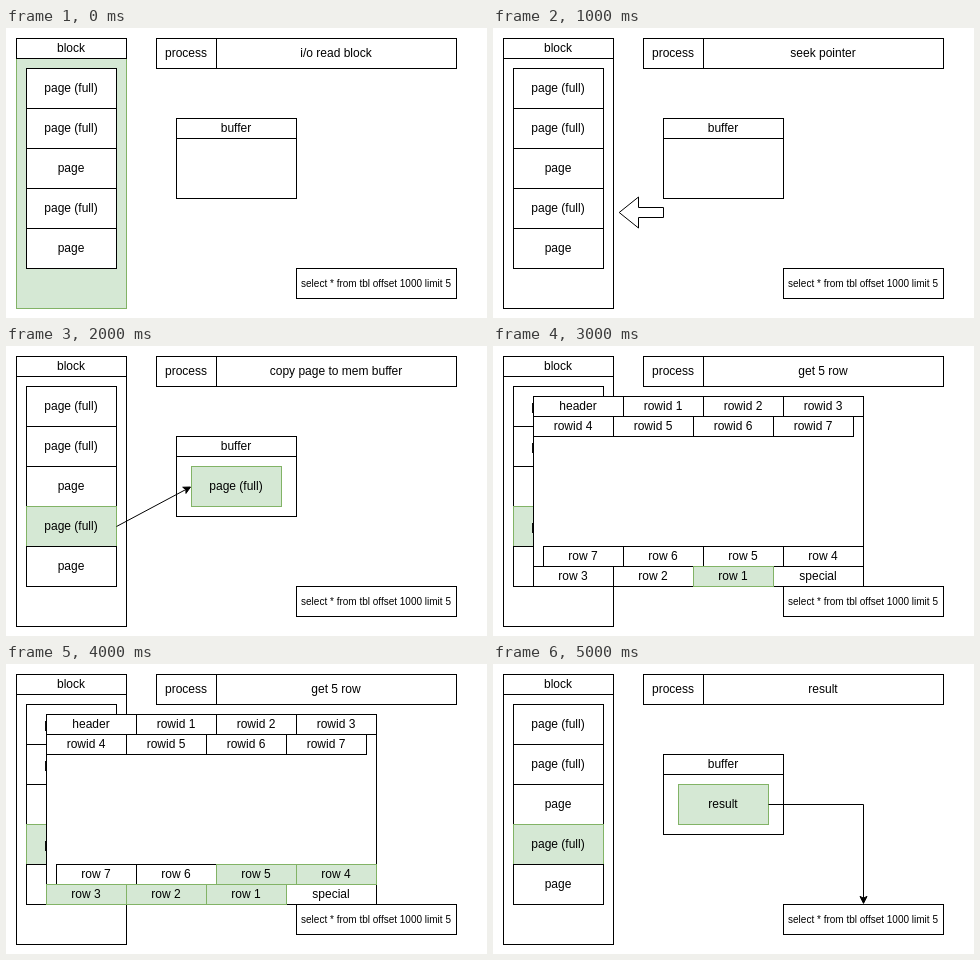
An HTML page with a canvas that plays this animation: 481 px wide and 290 px high, repeating every 6 s.

```html
<!DOCTYPE html>
<html lang="en">
<head>
<meta charset="utf-8">
<title>Reading a page from a block</title>
<style>
  html, body { margin: 0; width: 100%; height: 100%; overflow: hidden; background: #fff; }
  canvas { display: block; }
</style>
</head>
<body>
<canvas id="stage" width="481" height="290"></canvas>
<script>
const ctx = document.getElementById('stage').getContext('2d');
const STEP_MS = 1000;
const TITLES = ['i/o read block', 'seek pointer', 'copy page to mem buffer',
  'get 5 row', 'get 5 row', 'result'];
const PLAIN = { fill: '#fff', line: '#000' };
const GREEN = { fill: '#d5e8d4', line: '#82b366' };

function label(text, x, y, size = 12) {
  ctx.font = `${size}px "Liberation Sans", Arial, sans-serif`;
  ctx.textAlign = 'center';
  ctx.fillStyle = '#000';
  ctx.fillText(text, x, y + (size > 10 ? 4 : 3.5));
}

function box(x, y, w, h, text = '', look = PLAIN, size = 12) {
  ctx.fillStyle = look.fill;
  ctx.strokeStyle = look.line;
  ctx.lineWidth = 1;
  ctx.fillRect(x + 0.5, y + 0.5, w, h);
  ctx.strokeRect(x + 0.5, y + 0.5, w, h);
  if (text) label(text, x + w / 2, y + h / 2, size);
}

function trace(points) {
  ctx.beginPath();
  for (const [x, y] of points) ctx.lineTo(x + 0.5, y + 0.5);
}

// Polyline ending in a notched arrowhead
function connector(points) {
  const [tx, ty] = points[points.length - 1];
  const [px, py] = points[points.length - 2];
  const len = Math.hypot(tx - px, ty - py);
  const ux = (tx - px) / len, uy = (ty - py) / len;
  const at = (back, side) => [tx - ux * back - uy * side, ty - uy * back + ux * side];
  ctx.strokeStyle = ctx.fillStyle = '#000';
  ctx.lineWidth = 1;
  trace([...points.slice(0, -1), at(6.37, 0)]);
  ctx.stroke();
  trace([at(1.12, 0), at(8.12, 3.5), at(6.37, 0), at(8.12, -3.5)]);
  ctx.closePath();
  ctx.fill();
  ctx.stroke();
}

function pointer() {
  trace([[170, 189], [145, 189], [145, 199.5], [125.7, 184], [145, 168.5], [145, 179], [170, 179]]);
  ctx.closePath();
  ctx.fillStyle = '#fff';
  ctx.strokeStyle = '#000';
  ctx.fill();
  ctx.stroke();
}

function block(step) {
  box(10, 10, 110, 270, '', step === 0 ? GREEN : PLAIN);
  box(10, 10, 110, 20, 'block');
  [1, 1, 0, 1, 0].forEach((full, i) => {
    const look = i === 3 && step >= 2 ? GREEN : PLAIN;
    box(20, 40 + i * 40, 90, 40, full ? 'page (full)' : 'page', look);
  });
}

function buffer(content) {
  box(170, 90, 120, 80);
  box(170, 90, 120, 20, 'buffer');
  if (content) box(185, 120, 90, 40, content, GREEN);
}

function pageDetail(rowsRead) {
  box(40, 50, 330, 190);
  box(40, 50, 90, 20, 'header');
  for (let i = 1; i <= 7; i++) {
    const x = i < 4 ? 50 + i * 80 : 40 + (i - 4) * 80;
    box(x, i < 4 ? 50 : 70, 80, 20, 'rowid ' + i);
  }
  box(280, 220, 90, 20, 'special');
  // Rows fill from the right; later ones are drawn beneath the ones already read
  for (let i = 7; i >= 1; i--) {
    const x = i < 4 ? 280 - i * 80 : 290 - (i - 4) * 80;
    box(x, i < 4 ? 220 : 200, 80, 20, 'row ' + i, i <= rowsRead ? GREEN : PLAIN);
  }
}

function draw(step) {
  ctx.fillStyle = '#fff';
  ctx.fillRect(0, 0, 481, 290);
  block(step);
  box(150, 10, 60, 30, 'process');
  box(210, 10, 240, 30, TITLES[step]);
  box(290, 240, 160, 30, 'select * from tbl offset 1000 limit 5', PLAIN, 10);

  if (step === 3 || step === 4) {
    pageDetail(step === 3 ? 1 : 5);
    return;
  }
  buffer(['', '', 'page (full)', '', '', 'result'][step]);
  if (step === 1) pointer();
  if (step === 2) connector([[110, 180], [185, 140]]);
  if (step === 5) connector([[275, 140], [370, 140], [370, 240]]);
}

const start = performance.now();
function tick() {
  const elapsed = performance.now() - start;
  draw(Math.floor(elapsed / STEP_MS) % TITLES.length);
  requestAnimationFrame(tick);
}
tick();
</script>
</body>
</html>
```
